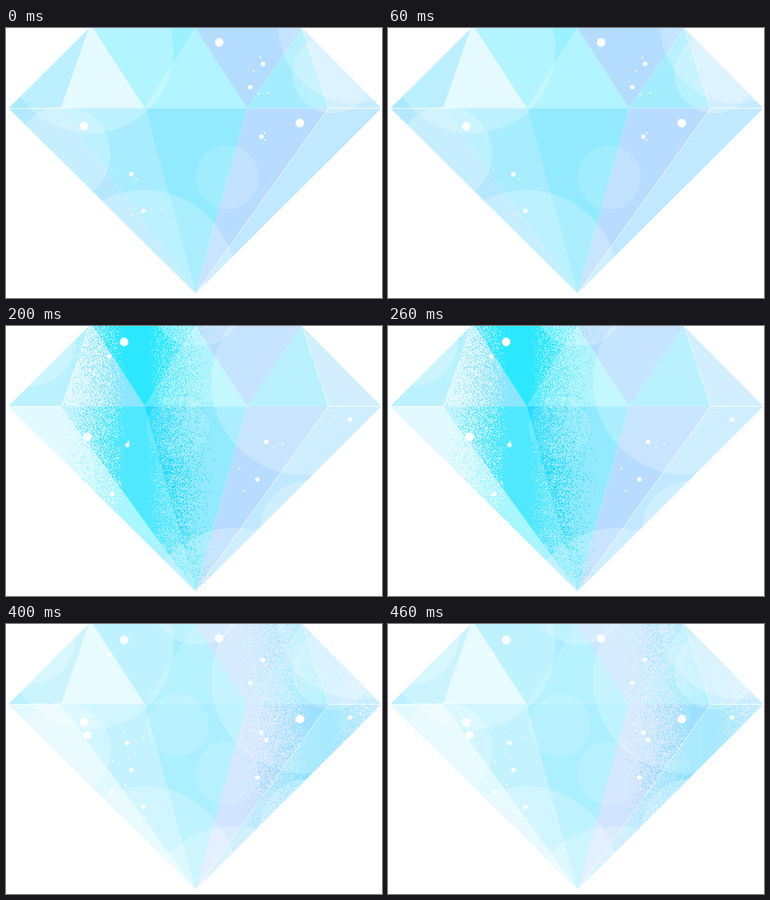
These frames come from a looping animation (471x338 px, 0.5 s). An HTML page with a canvas:

```html
<!DOCTYPE html>
<html lang="en">
<head>
<meta charset="utf-8">
<title>Diamond</title>
<style>
  html, body { margin: 0; width: 100%; height: 100%; overflow: hidden; background: #fff; }
  canvas { display: block; }
</style>
</head>
<body>
<canvas id="stage" width="471" height="338"></canvas>
<script>
const W = 471, H = 338, STEP = 100;
const stage = document.getElementById('stage').getContext('2d');

// Corners: girdle A P Q R S D, table B N M C, tip E
const GIRDLE = 100.5;
const corner = {
  A: [3, GIRDLE], P: [69, GIRDLE], Q: [174, GIRDLE], R: [302, GIRDLE], S: [404, GIRDLE], D: [470.5, GIRDLE],
  B: [104, 0], N: [109, 0], M: [237, 0], C: [371, 0], E: [237.5, 332.5]
};

// Every facet goes from its rest tone through a glow to a paler tone as the shine passes
const facets = [
  { shape: 'ABP', rest: '#a8eaff', glow: '#8cf4ff', pale: '#bcf1ff' },
  { shape: 'BNQP', rest: '#dbf8ff', glow: '#8ce6ff', pale: '#e1f9ff' },
  { shape: 'NQM', rest: '#9af1ff', glow: '#2ce8ff', pale: '#aceeff' },
  { shape: 'MQR', rest: '#b2f4ff', glow: '#58eaff', pale: '#b6f2ff' },
  { shape: 'MRC', rest: '#b4dcff', glow: '#38d4fc', pale: '#cce6ff' },
  { shape: 'CRS', rest: '#a4edff', glow: '#58e8ff', pale: '#cfe9ff' },
  { shape: 'CSD', rest: '#c6eaff', glow: '#90dcff', pale: '#cfeaff' },
  { shape: 'APE', rest: '#b5e8ff', glow: '#a8f6ff', pale: '#e2faff' },
  { shape: 'PQE', rest: '#a8ecff', glow: '#50e8ff', pale: '#c4f3ff' },
  { shape: 'QRE', rest: '#92eaff', glow: '#22daff', pale: '#acefff' },
  { shape: 'RSE', rest: '#b8dcff', glow: '#32ccff', pale: '#d0e4ff' },
  { shape: 'SDE', rest: '#c0e8ff', glow: '#5cdcff', pale: '#c6ebff' }
];

// Bubbles are [x, y, radius, opacity]; sparkles are [x, y], each small one trailing some dust
const groups = {
  a: {
    bubbles: [[105, 27, 105], [71, 158, 60], [173, 318, 115], [277, 187, 40], [438, -3, 97], [409, 57, 50]],
    large: [[267, 18], [98, 123], [368, 119]],
    small: [[322, 45], [306, 74], [157, 183], [172, 229], [320, 136]]
  },
  b: {
    bubbles: [[132, 26, 125], [327, 24, 63, .4], [437, 112, 112], [40, 163, 58], [199, 191, 40]],
    large: [[344, 68], [213, 305]],
    small: [[216, 79], [263, 90], [222, 254], [283, 272]]
  },
  c: {
    bubbles: [[30, 17, 58], [240, -32, 58], [374, 70, 117], [378, 254, 60], [285, 365, 112], [215, 127, 39]],
    large: [[148, 20], [102, 139]],
    small: [[129, 38], [152, 149], [133, 210], [326, 145], [315, 192], [431, 117]]
  }
};

// Where the shine stands in each pose, and which decorations twinkle
const poses = [
  { shine: -W, groups: 'a' },
  { shine: 121, groups: 'b' },
  { shine: 163, groups: 'c' },
  { shine: 275, groups: 'b' },
  { shine: 395, groups: 'ac' }
];
const PLATEAU = 15, FALLOFF = 86;

function layer() {
  const canvas = document.createElement('canvas');
  canvas.width = W;
  canvas.height = H;
  return canvas.getContext('2d');
}

function trace(g, names) {
  g.beginPath();
  for (const n of names) g.lineTo(...corner[n]);
}

function gem(tone) {
  const g = layer();
  for (const facet of facets) {
    trace(g, facet.shape);
    g.fillStyle = facet[tone];
    g.fill();
  }
  return g;
}

function disc(g, x, y, r, opacity = 1) {
  g.fillStyle = `rgba(255,255,255,${opacity})`;
  g.beginPath();
  g.arc(x, y, r, 0, Math.PI * 2);
  g.fill();
}

function drawBubble(g, [x, y, r, opacity = r < 50 ? .13 : .23]) {
  disc(g, x, y, r, opacity);
}

function seam(g, names, opacity) {
  trace(g, names);
  g.strokeStyle = `rgba(255,255,255,${opacity})`;
  g.stroke();
}

function randomizer(seed) {
  return () => {
    seed = (Math.imul(seed, 1664525) + 1013904223) >>> 0;
    return seed / 4294967296;
  };
}

function grain(shine, random) {
  const g = layer(), image = g.createImageData(W, H);
  for (let i = 0; i < W * H; i++) {
    const distance = Math.abs(i % W - shine) - PLATEAU;
    const density = Math.min(1, Math.max(0, 1 - distance / FALLOFF)) ** 1.7;
    image.data[i * 4 + 3] = random() < density ? 255 : 0;
  }
  g.putImageData(image, 0, 0);
  return g.canvas;
}

function drawShine(g, shine, strength, random) {
  if (shine <= 0) return;
  g.drawImage(gem('pale').canvas, 0, 0, shine, H, 0, 0, shine, H);
  const glow = gem('glow');
  glow.globalCompositeOperation = 'destination-in';
  glow.drawImage(grain(shine, random), 0, 0);
  g.globalAlpha = strength;
  g.drawImage(glow.canvas, 0, 0);
  g.globalAlpha = 1;
}

function drawSparkles(g, { large, small }, random) {
  for (const [x, y] of large) disc(g, x, y, 5.4);
  for (const [x, y] of small) {
    disc(g, x, y, 2.8);
    for (let i = 0; i < 2; i++) disc(g, x + 50 * random() - 25, y + 40 * random() - 20, 1.1);
  }
}

function render(pose, index) {
  const g = layer(), random = randomizer(71 + index);
  const shown = [...pose.groups].map(key => groups[key]);
  const strength = Math.min(1, (poses.length - index) / 2);
  g.fillStyle = '#fff';
  g.fillRect(0, 0, W, H);
  g.save();
  trace(g, 'ABCDE');
  g.clip();
  g.drawImage(gem('rest').canvas, 0, 0);
  drawShine(g, pose.shine, strength, random);
  for (const { bubbles } of shown) bubbles.forEach(b => drawBubble(g, b));
  seam(g, 'AP', .8);
  seam(g, 'SD', .9);
  seam(g, 'SE', .65);
  seam(g, 'CS', .4);
  for (const group of shown) drawSparkles(g, group, random);
  g.restore();
  return g.canvas;
}

const pictures = poses.map(render);
const start = performance.now();

function draw() {
  const time = performance.now() - start;
  stage.drawImage(pictures[Math.floor(time / STEP) % pictures.length], 0, 0);
  requestAnimationFrame(draw);
}
draw();
</script>
</body>
</html>
```
